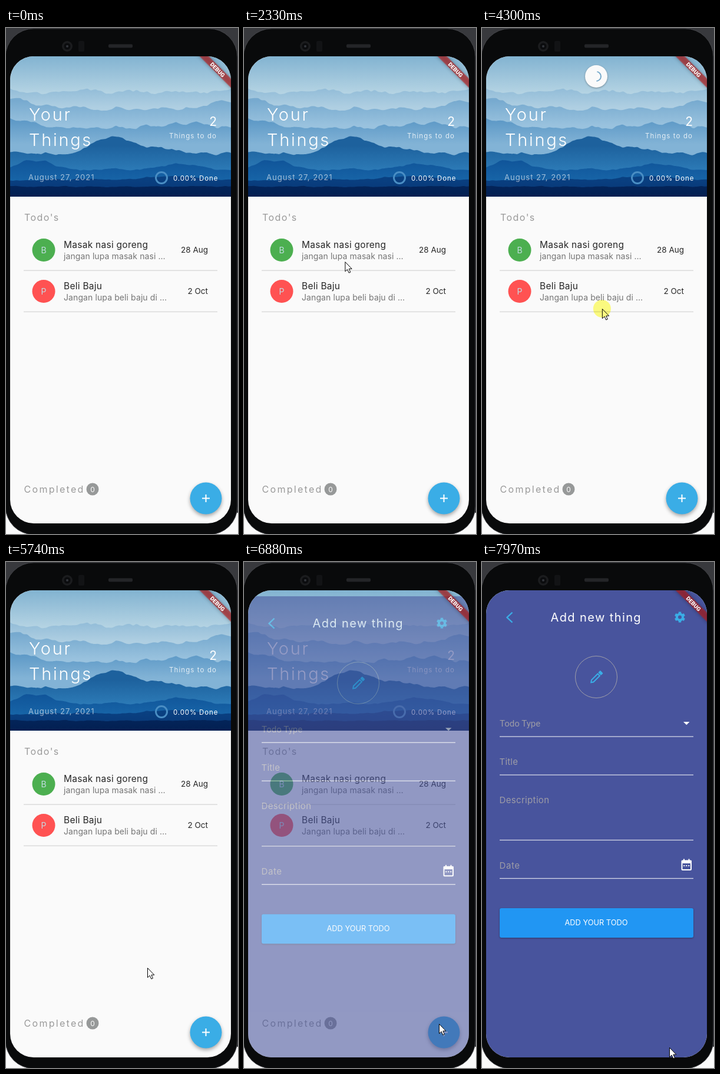
Recreate the animation shown at these times as an HTML page. Size 394x858 px, loop 8 s.

```html
<!DOCTYPE html>
<html lang="id">
<head>
<meta charset="utf-8">
<title>Todo app</title>
<style>
  html, body { margin: 0; width: 100%; height: 100%; overflow: hidden; background: #38393d; }
  svg { display: block; width: 394px; height: 858px; }
  text { font-family: Inter, "Open Sans", sans-serif; white-space: pre; }
  .roboto { font-family: Roboto, "Liberation Sans", sans-serif; }
  .fab { filter: drop-shadow(0 3px 3px rgba(0,0,0,.35)); }
  .lift { filter: drop-shadow(0 1px 1.5px rgba(0,0,0,.35)); }
  .banner { filter: drop-shadow(0 0 3px rgba(0,0,0,.5)); }
  #press { mix-blend-mode: multiply; }
</style>
</head>
<body>
<svg id="stage" viewBox="0 0 394 858"></svg>
<script>
const LOOP = 8000;
const ACCENT = '#3aade6';
const HINT = '#9d9ca6';
const MIDDLE = 'text-anchor="middle"';
const END = 'text-anchor="end"';

// ---------- drawing helpers ----------
const text = (x, y, size, str, fill, spacing = 0, extra = '') =>
  `<text x="${x}" y="${y}" font-size="${size}" fill="${fill}" letter-spacing="${spacing}" ${extra}>${str}</text>`;
const rect = (x, y, w, h, fill, extra = '') =>
  `<rect x="${x}" y="${y}" width="${w}" height="${h}" fill="${fill}" ${extra}/>`;
const circle = (x, y, r, fill, extra = '') =>
  `<circle cx="${x}" cy="${y}" r="${r}" fill="${fill}" ${extra}/>`;
const stroke = (d, color, width, extra = '') =>
  `<path d="${d}" fill="none" stroke="${color}" stroke-width="${width}" ${extra}/>`;
const fade = (id, y1, y2, top, bottom) =>
  `<linearGradient id="${id}" gradientUnits="userSpaceOnUse" x1="0" x2="0" y1="${y1}" y2="${y2}">
   <stop stop-color="${top}"/><stop offset="1" stop-color="${bottom}"/></linearGradient>`;

// ---------- mountain header ----------
// each ridge: base line, colour at the crest, colour of the mist, hills as [x, height, width]
const ridges = [
  [107, '#8ab7d5', '#afcfe2', []],
  [137, '#77aacf', '#99c2de', [[10, 16, 50], [370, 12, 40]]],
  [169, '#5c98c6', '#82b3d6', [[10, 14, 50], [300, 8, 60]]],
  [213, '#1d619d', '#2c7ab6', [[183, 30, 45], [265, 9, 45]]],
  [239, '#10559a', '#1968aa', [[50, 15, 35], [300, 8, 45]]],
  [257, '#0a4486', '#083675', [[280, 6, 50]]],
  [269, '#04285f', '#021c4c', []],
];

const hash = n => { const s = Math.sin(n * 127.1) * 43758.5; return s - Math.floor(s) - .5; };

function noise(x, step, seed) {
  const i = Math.floor(x / step), f = x / step - i;
  return hash(i + seed) * (1 - f) + hash(i + 1 + seed) * f;
}

function ridge([base, crest, mist, hills], i) {
  const rough = 10 - i * 1.3;
  let d = 'M7 286';
  for (let x = 7; x <= 383; x += 2) {
    const hill = hills.reduce((sum, [cx, h, w]) => sum + h * Math.exp(-(((x - cx) / w) ** 2)), 0);
    const y = base - hill + rough * (noise(x, 17, i * 90) + .4 * noise(x, 6, i * 50));
    d += `L${x} ${y.toFixed(1)}`;
  }
  return fade('ridge' + i, base - 14, base + 28, crest, mist) + `<path d="${d}V286Z" fill="url(#ridge${i})"/>`;
}

const photo = fade('sky', 48, 110, '#82b3d1', '#b4d3e3') +
  rect(7, 48, 375, 238, 'url(#sky)') + ridges.map(ridge).join('');

// ---------- home page ----------
const todo = (y, color, letter, name, note, date) =>
  circle(64, y, 19.5, color) +
  text(64, y + 5, 14, letter, '#c3dbe2', 0, MIDDLE) +
  text(98, y - 4, 15.5, name, '#262626', .27) +
  text(98, y + 15, 14, note, '#757575', .1) +
  text(343, y + 4.5, 13.5, date, '#262626', 0, END) +
  rect(30, y + 34, 329, 1.5, '#dcdcdc');

const home = rect(7, 48, 375, 792, '#fafafa') + photo +
  text(39, 157, 29, 'Your', '#fff', 2.7, 'font-weight="300"') +
  text(39, 200, 29, 'Things', '#fff', 2.7, 'font-weight="300"') +
  text(38, 258, 13, 'August 27, 2021', 'rgba(255,255,255,.6)', 1) +
  text(358, 166, 21, '2', '#fff', 0, END) +
  text(277, 187, 11.5, 'Things to do', 'rgba(255,255,255,.8)', 1.1) +
  circle(264, 254, 9.5, 'none', 'stroke="#4a8ec4" stroke-width="3"') +
  text(284, 259, 11.5, '0.00% Done', '#fff', .85) +
  text(31, 327, 16, "Todo's", '#9a9a9a', 1.45) +
  todo(376.5, '#4caf50', 'B', 'Masak nasi goreng', 'jangan lupa masak nasi …', '28 Aug') +
  todo(446.5, '#ff5252', 'P', 'Beli Baju', 'Jangan lupa beli baju di …', '2 Oct') +
  text(30.5, 788, 16, 'Completed', '#9a9a9a', 2.3) +
  circle(147, 782, 10.5, '#979999') + text(147, 786.5, 12, '0', '#fff', 0, MIDDLE) +
  circle(339.5, 797.5, 27, ACCENT, 'class="fab"') +
  stroke('M333 797.5h13M339.5 791v13', '#fff', 2);

// ---------- form page ----------
const teeth = [0, 1, 2, 3, 4, 5].map(i => rect(-2.2, -9, 4.4, 4, ACCENT, `transform="rotate(${i * 60})"`)).join('');
const gear = '<g transform="translate(336 93.5)">' +
  circle(0, 0, 5, 'none', `stroke="${ACCENT}" stroke-width="4"`) + teeth + '</g>';
const pencil = '<g transform="translate(194 195.5) rotate(45)">' +
  stroke('M-2.4 -6V9L0 12.4L2.4 9V-6Z', ACCENT, 2) + rect(-3.4, -13, 6.8, 5, ACCENT, 'rx="1"') + '</g>';
const calendar = rect(339.5, 506.5, 15.5, 15.5, 'none', 'rx="1" stroke="#fff" stroke-width="2"') +
  rect(339, 506, 16.5, 5, '#fff') + stroke('M343 503.5v4M351.5 503.5v4', '#fff', 2) +
  stroke('M342.3 515h10', '#fff', 2, 'stroke-dasharray="2 2"');
const field = (label, y, line, more) =>
  text(29.5, y, 15, label, HINT, more) + rect(30, line - .6, 329, 1.3, '#d3d6e6');

const form = rect(7, 48, 375, 792, '#48549d') +
  stroke('M51.5 85.5L42.5 94L51.5 102.5', ACCENT, 2.4) +
  text(116.5, 101, 20, 'Add new thing', '#fff', 1.4) + gear +
  circle(194, 195, 35.5, 'none', 'stroke="#a09fa9"') + pencil +
  `<g class="roboto-field">${field('', 278.5, 296, 0)}</g>` +
  text(30, 278.5, 15, 'Todo Type', HINT, 0, 'class="roboto"') +
  '<path d="M342 271h10.5l-5.2 5.2z" fill="#fff"/>' +
  field('Title', 344, 361, .2) + field('Description', 409, 471.5, .35) +
  field('Date', 520, 536.5, .6) + calendar +
  rect(30, 587, 329, 50, '#2196f3', 'rx="3" class="lift"') +
  text(194, 616, 12.8, 'ADD YOUR TODO', '#fff', 0, MIDDLE);

// ---------- phone ----------
const phone = rect(0, 0, 394, 858, '#38393d') + rect(0, 822, 394, 36, '#fafafa') +
  rect(-1, 1, 394, 858, '#090a0b', 'rx="48" stroke="#46474b"') +
  circle(104, 31, 9, '#1b1c1e') + circle(104, 31, 5.5, '#0b0c0e') + circle(104, 31, 2, '#33363b') +
  rect(123, 22, 10, 18, '#121315', 'rx="2"') + rect(174, 27.5, 41, 6, '#242528', 'rx="2"');

const banner = '<g transform="translate(359.3 70.7) rotate(45)">' +
  rect(-60, -5.5, 120, 11, 'rgba(183,28,28,.66)', 'class="banner"') +
  text(0, 3.5, 9.6, 'DEBUG', '#fff', 0, MIDDLE + ' class="roboto" font-weight="900"') + '</g>';

stage.innerHTML = `<clipPath id="screen">${rect(7, 48, 375, 792, '#000', 'rx="40"')}</clipPath>
  ${phone}
  <g clip-path="url(#screen)">${home}
    <g id="spinner">${circle(0, 0, 19, '#fafafa', 'class="lift"')}
      <path id="arc" fill="none" stroke="#76a9ca" stroke-width="2"/></g>
    <g id="page">${form}</g>${banner}</g>
  <path id="cursor" d="M.5 .5V16.6L4.2 13.2L6.8 19L9.4 17.9L6.9 12.2H11.8Z" fill="#fff" stroke="#000"/>
  ${circle(0, 0, 15, '#fffe82', 'id="press"')}`;
const [spinner, arc, page, press, cursor] =
  ['spinner', 'arc', 'page', 'press', 'cursor'].map(id => document.getElementById(id));

// ---------- motion ----------
// pointer moves: start, end, x, y
const moves = [
  [480, 790, 258, 209], [1060, 1150, 192, 96], [1409, 1410, 189, 86], [1410, 2070, 134, 451],
  [2240, 2400, 196, 360], [2870, 2960, 200, 294], [2960, 3490, 212, 568], [3780, 4070, 217, 387],
  [4240, 4373, 187, 590], [5230, 5500, 140, 290], [5500, 5740, 240, 688], [5740, 6030, 307, 746],
  [6060, 6300, 331, 783], [6900, 7600, 292, 631], [7710, 7970, 318, 823],
];
const presses = [[2960, 3470], [4050, 4560], [6500, 6620]];

const clamp = v => Math.max(0, Math.min(1, v));
const smooth = v => v * v * (3 - 2 * v);

function pointer(t) {
  let x = 324, y = 803;
  for (const [start, end, toX, toY] of moves) {
    const f = smooth(clamp((t - start) / (end - start)));
    x += (toX - x) * f;
    y += (toY - y) * f;
  }
  return [x, y];
}

function bezier(x1, y1, x2, y2) {
  const at = (a, b, s) => 3 * (1 - s) ** 2 * s * a + 3 * (1 - s) * s * s * b + s ** 3;
  return x => {
    let lo = 0, hi = 1;
    for (let i = 0; i < 24; i++) {
      const mid = (lo + hi) / 2;
      if (at(x1, x2, mid) < x) lo = mid; else hi = mid;
    }
    return at(y1, y2, lo);
  };
}
const slide = bezier(.4, 0, .2, 1), easeIn = bezier(.42, 0, 1, 1);

const show = (el, on) => el.setAttribute('visibility', on ? 'visible' : 'hidden');
const move = (el, x, y, more = '') => el.setAttribute('transform', `translate(${x} ${y}) ${more}`);

function draw(t) {
  const [x, y] = pointer(t);
  move(cursor, x, y);
  show(cursor, t >= 480);
  move(press, x, y);
  show(press, presses.some(([a, b]) => t >= a && t < b));

  // refresh indicator drops in, spins, then shrinks away
  const spinning = t >= 4240 && t < 4940;
  show(spinner, spinning);
  if (spinning) {
    move(spinner, 194, 73 + 9 * clamp((t - 4240) / 50), `scale(${1 - clamp((t - 4760) / 180)})`);
    const start = -1.4 + (t - 4300) * .0065;
    const sweep = 2.9 + 1.3 * Math.sin((t - 4300) / 210);
    const dot = a => `${8 * Math.cos(a)} ${8 * Math.sin(a)}`;
    arc.setAttribute('d', `M${dot(start)}A8 8 0 ${+(sweep > Math.PI)} 1 ${dot(start + sweep)}`);
  }

  // the form slides up while fading in
  const p = clamp((t - 6664) / 300);
  show(page, p > 0);
  page.setAttribute('opacity', easeIn(p));
  move(page, 0, 198 * (1 - slide(p)));
}

function tick() {
  draw(performance.now() % LOOP);
  requestAnimationFrame(tick);
}
tick();
</script>
</body>
</html>
```
